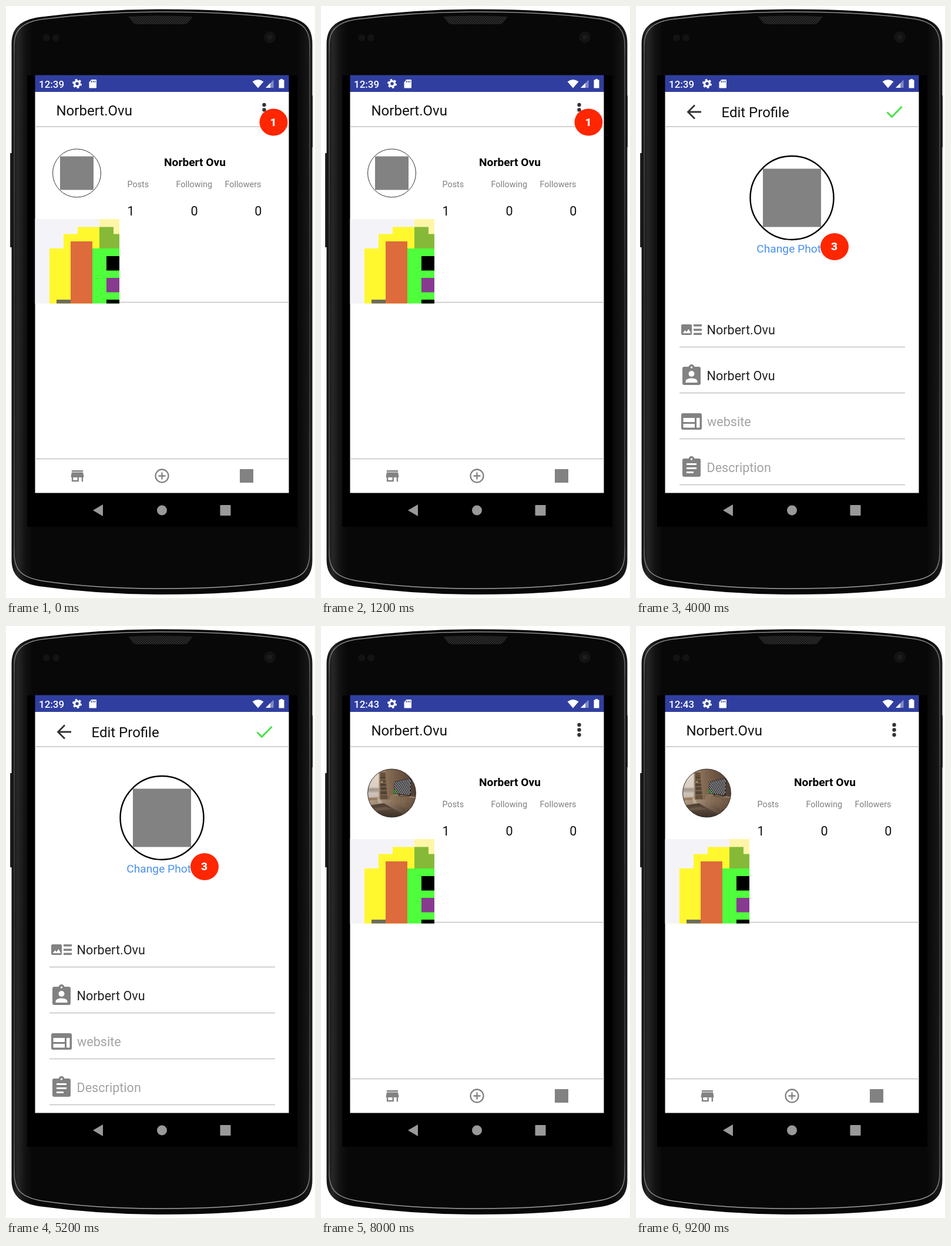
Write an HTML page that moves like this. It is 526 px wide and 1006 px high and loops after 10000 ms.

```html
<!DOCTYPE html>
<html lang="en">
<head>
<meta charset="utf-8">
<title>Profile photo walkthrough</title>
<style>
html, body { margin: 0; width: 100%; height: 100%; overflow: hidden; background: #fff; }
svg { display: block; }
text { font-family: Roboto, "Noto Sans", sans-serif; font-size: 24px; fill: #111; white-space: pre; }
.screen { visibility: hidden; }
.m { text-anchor: middle; }
.bold { font-size: 19.2px; font-weight: 700; fill: #000; }
.cap { font-size: 14.4px; fill: #808080; }
.count { font-size: 21.6px; }
.item { font-size: 19.2px; fill: #222; }
.field { font-size: 21.6px; fill: #222; }
.hint { fill: #a3a3a3; }
.tab { font-size: 16.8px; font-weight: 500; }
.clock { font-size: 17px; font-weight: 500; fill: #fff; }
.badge ellipse { fill: #ff2600; }
.badge text { font-size: 19px; font-weight: 900; font-stretch: 75%; fill: #fff; text-anchor: middle; }
.rule { stroke: #c3c3c3; stroke-width: 1.5; fill: none; }
.icon { fill: none; stroke: #333; stroke-width: 2.8; }
.grey { fill: #828282; }
</style>
</head>
<body>
<svg id="stage" width="526" height="1006" viewBox="0 0 526 1006">
<defs>
  <linearGradient id="side">
    <stop offset="0" stop-color="#111"/><stop offset=".02" stop-color="#272727"/>
    <stop offset=".045" stop-color="#121212"/><stop offset=".07" stop-color="#080808"/>
    <stop offset=".95" stop-color="#080808"/><stop offset="1" stop-color="#1b1b1b"/>
  </linearGradient>
  <linearGradient id="rim" x1="0" y1="0" x2="0" y2="1">
    <stop offset="0" stop-color="#8a8a8a"/><stop offset=".08" stop-color="#555"/>
    <stop offset=".5" stop-color="#333"/><stop offset=".92" stop-color="#555"/>
    <stop offset="1" stop-color="#a0a0a0"/>
  </linearGradient>
  <pattern id="mesh" width="4" height="4" patternUnits="userSpaceOnUse">
    <rect width="4" height="4" fill="#141414"/><path d="M0 0L4 4M4 0L0 4" stroke="#333" stroke-width=".8"/>
  </pattern>
  <linearGradient id="sky" x1="0" y1="0" x2="0" y2="1">
    <stop offset="0" stop-color="#e6dbd0"/><stop offset=".62" stop-color="#dacdc1"/>
    <stop offset=".7" stop-color="#a2958b"/><stop offset=".78" stop-color="#b3a69c"/>
    <stop offset=".84" stop-color="#cfc3ba"/><stop offset="1" stop-color="#c3b7ae"/>
  </linearGradient>
  <linearGradient id="wall">
    <stop offset="0" stop-color="#8a7058"/><stop offset=".5" stop-color="#6c5541"/><stop offset="1" stop-color="#4e3d30"/>
  </linearGradient>
  <linearGradient id="floor">
    <stop offset="0" stop-color="#b7a28b"/><stop offset=".45" stop-color="#957d66"/><stop offset="1" stop-color="#4f3f33"/>
  </linearGradient>
  <linearGradient id="rug" x1="0" y1="0" x2="0" y2="1">
    <stop offset="0" stop-color="#4c3e33"/><stop offset=".4" stop-color="#675444"/><stop offset="1" stop-color="#4a3b30"/>
  </linearGradient>
  <linearGradient id="wood">
    <stop offset="0" stop-color="#8f765d"/><stop offset="1" stop-color="#6c5643"/>
  </linearGradient>
  <linearGradient id="shade" x1="0" y1="0" x2="0" y2="1">
    <stop offset="0" stop-color="#2a1f17" stop-opacity="0"/><stop offset="1" stop-color="#2a1f17" stop-opacity=".4"/>
  </linearGradient>
  <clipPath id="face"><circle cx="120.5" cy="284" r="41"/></clipPath>

  <symbol id="room" viewBox="50 158.5 432 432">
    <rect x="50" y="158" width="432" height="433" fill="url(#floor)"/>
    <path d="M50 158H215L237 430L50 441Z" fill="#977c62"/>
    <path d="M50 158H152V410L50 417Z" fill="url(#sky)"/>
    <path d="M151 158V410L50 416" fill="none" stroke="#bfa78e" stroke-width="4"/>
    <path d="M210 158H482V410L257 390L252 432H237Z" fill="url(#wall)"/>
    <path d="M262 158V250M300 158V240M338 158V235M376 158V232M414 158V225M452 158V400" stroke="#55432f" fill="none" opacity=".4"/>
    <path d="M161 190H212L236 430H162Z" fill="#65503c"/>
    <path d="M163 229h42v19h-42zM178 266h28v16h-28zM164 290h48v24h-48zM165 324h52v23h-52zM167 363h52v23h-52z" fill="#4d4136"/>
    <ellipse cx="179" cy="274" rx="8" ry="6" fill="#c1ae99"/>
    <path d="M161 190V430M210 190L234 430M162 249H217M162 283H220M162 315H224M162 349H227M162 388H231" fill="none" stroke="#9a7e62" stroke-width="4"/>
    <path d="M50 455L160 434M50 475L235 433M110 478L75 450M150 472L115 444M215 474L180 440M290 500L220 438" stroke="#846d57" fill="none"/>
    <path d="M50 487L195 466L420 591H50Z" fill="url(#rug)"/>
    <path d="M50 520L205 497L262 520L50 545Z" fill="#83705d" opacity=".6"/>
    <path d="M257 392L306 385L482 408V420L400 428Z" fill="#967c63"/>
    <path d="M257 392L482 421V510L402 520L262 455Z" fill="url(#wood)"/>
    <path d="M313 399V478M342 403V490M410 414V519" stroke="#5f4b3a" fill="none"/>
    <path d="M262 455l8 4-5 14h-3zM386 512l12 7-6 17h-3zM441 515l12-1-3 24h-3z" fill="#7d6550"/>
    <path d="M323 386L365 391L430 399Q420 407 355 404L325 397L340 392" fill="none" stroke="#28221e" stroke-width="4"/>
    <path d="M286 273L441 238L437 398L287 378Z" fill="#2a2520"/>
    <path d="M289 277L435 244L432 391L289 375Z" fill="#b0b0b7"/>
    <path id="checks" fill="#111"/>
    <path d="M288 347L304 349V377L288 375Z" fill="#12a512"/>
    <path d="M139 412l5 5 7-1 4-4 2 16 11 12q8 12 4 20h17l-2 3-22 3-23-1-2-25-3-16Z" fill="#b9aa96"/>
    <rect x="50" y="450" width="432" height="141" fill="url(#shade)"/>
  </symbol>

  <rect id="page" x="49.5" y="146" width="432" height="681.5"/>

  <g id="profile">
    <use href="#page" fill="#fff"/>
    <path class="rule" d="M49.5 205H481.5M193 503.5H481.5"/>
    <text x="85.5" y="186">Norbert.Ovu</text>
    <g fill="#333"><circle cx="439.5" cy="168" r="3.2"/><circle cx="439.5" cy="176.5" r="3.2"/><circle cx="439.5" cy="185" r="3.2"/></g>
    <text class="bold m" x="321.5" y="272">Norbert Ovu</text>
    <text class="cap" x="206.5" y="308">Posts</text>
    <text class="cap" x="289.5" y="308">Following</text>
    <text class="cap" x="372.5" y="308">Followers</text>
    <text class="count" x="206.5" y="356">1</text>
    <text class="count" x="314.5" y="356">0</text>
    <text class="count" x="423.3" y="356">0</text>
    <rect x="49.5" y="362" width="143.5" height="143.5" fill="#f4f4f8"/>
    <path d="M74 505.5V412H98V387.5H122V375.5H159V412H147V505.5Z" fill="#fff82f"/>
    <path d="M159 362H193V388H159Z" fill="#fff5a6"/>
    <path d="M159 375.5H183V387.5H193V412H159Z" fill="#86b938"/>
    <path d="M147 412H193V505.5H147Z" fill="#4fff3c"/>
    <path d="M110 400H147V505.5H110Z" fill="#dd6b3c"/>
    <path d="M171 425h22v24.5h-22zM171 499h22v6.5h-22z" fill="#000"/>
    <path d="M171 462h22v24.5h-22z" fill="#873a8f"/>
    <path d="M86 499h24v6.5h-24z" fill="#6c6c5c"/>
  </g>

  <g id="tabs">
    <path class="rule" d="M49.5 769.5H481.5"/>
    <path class="grey" transform="translate(107.1 784.2) scale(1.2)" d="M20 4H4v2h16V4zm1 10v-2l-1-5H4l-1 5v2h1v6h10v-6h4v6h2v-6h1zm-9 4H6v-4h6v4z"/>
    <g fill="none" stroke="#828282" stroke-width="2.3"><circle cx="265.5" cy="798.5" r="11"/><path d="M259.5 798.5h12M265.5 792.5v12"/></g>
    <rect class="grey" x="398" y="787" width="23" height="23"/>
  </g>

  <path id="back" class="icon" d="M111 180H89M100 168.5L88.5 180l11.5 11.5"/>
</defs>

<!-- handset -->
<path d="M10 250h-3v160h3zM520 152h2v88h-2z" fill="#222"/>
<path d="M9.5 64C9.5 36 26 24 56 19Q160 5.5 265 5.5Q390 5.5 476 18C508 23 521.5 36 521.5 64V941C521.5 969 508 982 476 987Q390 1000 265 1000Q160 1000 56 986C26 981 9.5 969 9.5 941Z" fill="url(#side)"/>
<path d="M14 66C14 40 29 28 58 23Q160 10 265 10Q390 10 474 22C505 27 517 40 517 66V930C517 960 504 972 470 977Q385 990 265 990Q150 990 62 977C28 971 14 960 14 930Z" fill="none" stroke="url(#rim)" stroke-width="1.6"/>
<path d="M208 18Q265 15 318 18L310 28Q308 31 302 31H224Q218 31 216 28Z" fill="url(#mesh)"/>
<g fill="#131313"><circle cx="69" cy="54" r="6"/><circle cx="85" cy="54" r="6"/><circle cx="449" cy="53" r="10"/></g>
<circle cx="449" cy="53" r="4" fill="#1c1c22"/>
<rect x="36" y="118" width="460" height="767" fill="#000"/>
<g fill="#999"><path d="M148 857L165 847V867Z"/><circle cx="265.5" cy="857" r="8.5"/><rect x="364.5" y="848" width="18" height="18" rx="1"/></g>

<!-- status bar -->
<rect x="49.5" y="117.5" width="432" height="29" fill="#303f9f"/>
<text id="clock" class="clock" x="56" y="138.5"></text>
<g fill="none" stroke="#fff"><circle cx="121" cy="132" r="4.4" stroke-width="3.4"/><circle cx="121" cy="132" r="6.8" stroke-width="2.4" stroke-dasharray="3.56"/></g>
<path d="M145.5 125H153q1 0 1 1V138.5q0 1-1 1H142.5q-1 0-1-1V129.5Z" fill="#fff"/>
<path d="M145.5 127v3M148.5 127v3M151.5 127v3" stroke="#303f9f" stroke-width="1.3"/>
<path d="M419.5 128.5Q429 121.5 438.5 128.5L429 139.5Z" fill="#fff"/>
<path d="M455.5 125.5V139H442Z" fill="#fff" opacity=".4"/><path d="M450 131V139H442Z" fill="#fff"/>
<path d="M467 124h4v1.5h2.5v14h-9v-14h2.5Z" fill="#fff"/>

<!-- screens -->
<g class="screen">
  <use href="#profile"/><use href="#tabs"/>
  <rect class="grey" x="92" y="255.5" width="57" height="57"/>
  <circle cx="120.5" cy="284" r="41" fill="none" stroke="#333"/>
  <g class="badge" data-at="455.5 197.5">1</g>
</g>
<g class="screen">
  <use href="#page" fill="#fff"/>
  <use href="#tabs"/><use href="#back"/>
  <text x="145.5" y="189">Options</text>
  <text x="74" y="275" style="font-size:42px">Account Settings</text>
  <path class="rule" d="M49.5 205H481.5M74 285.5H458M74 344.5H458M74 403H458"/>
  <text class="item" x="91.5" y="322">Edit Profile</text>
  <text class="item" x="91.5" y="381">Sign out</text>
  <g class="badge" data-at="198.5 310">2</g>
</g>
<g class="screen">
  <use href="#page" fill="#fff"/>
  <use href="#back"/>
  <text x="145.5" y="189">Edit Profile</text>
  <path d="M427.5 180.5L435.5 188.5L452.5 171" class="icon" style="stroke:#3fe33f"/>
  <path class="rule" d="M49.5 205H481.5M74 579.5H458M74 657.5H458M74 735.5H458M74 813.5H458"/>
  <rect class="grey" x="216" y="276.5" width="99" height="99"/>
  <circle cx="265.5" cy="326" r="71" fill="none" stroke="#000" stroke-width="2.4"/>
  <text class="item m" x="265.5" y="419" style="fill:#4a90f0">Change Photo</text>
  <g class="grey">
    <rect x="77" y="541" width="18" height="18" rx="2"/>
    <path d="M98 541h14v3.5h-14zM98 548.5h14v3.5h-14zM98 555.5h14v3.5h-14z"/>
    <rect x="79" y="613" width="31" height="31" rx="3"/><circle cx="94.5" cy="614" r="5"/>
    <rect x="77" y="692" width="35" height="28" rx="3"/>
    <rect x="79" y="769" width="31" height="31" rx="3"/><circle cx="94.5" cy="770" r="5"/>
  </g>
  <g fill="#fff">
    <path d="M79.5 556l4-5 2.5 3 3.5-5 4 7z"/>
    <circle cx="94.5" cy="614" r="1.7"/><circle cx="94.5" cy="625" r="5"/><path d="M84.5 640v-2q0-5 10-5.5q10 .5 10 5.5v2z"/>
    <path d="M80.5 700h19.5v7h-19.5zM80.5 710h19.5v6.5h-19.5zM103 700h5.5v16.5h-5.5z"/>
    <circle cx="94.5" cy="770" r="1.7"/><path d="M86 777h17v3h-17zM86 784h17v3h-17zM86 791h12v3h-12z"/>
  </g>
  <text class="field" x="120.5" y="558">Norbert.Ovu</text>
  <text class="field" x="120.5" y="636">Norbert Ovu</text>
  <text class="field hint" x="121" y="714">website</text>
  <text class="field hint" x="120.5" y="792">Description</text>
  <g class="badge" data-at="338 409">3</g>
</g>
<g class="screen">
  <use href="#page" fill="#fafafa"/>
  <path class="icon" d="M77.5 167L96.5 186M96.5 167L77.5 186"/>
  <text class="item" x="138.5" y="183">/camera</text>
  <path d="M242 174h13l-6.5 6.5z" fill="#777"/>
  <text x="412.5" y="185.5" style="fill:#4a90f0">Next</text>
  <path class="rule" d="M49.5 205H481.5M49.5 826.5H481.5"/>
  <svg x="49.5" y="207" width="432" height="335" viewBox="50 207 432 335"><use href="#room" x="50" y="158.5" width="432" height="432"/></svg>
  <use href="#room" x="49.5" y="544" width="143.5" height="143.5"/>
  <text class="tab m" x="157" y="803" style="fill:#212121">GALLERY</text>
  <text class="tab m" x="373.5" y="803" style="fill:#757575">PHOTO</text>
  <rect x="49.5" y="823" width="216" height="2.5" fill="#ff4081"/>
  <g class="badge" data-at="173.5 669">4</g>
  <g class="badge" data-at="452.5 179">5</g>
</g>
<g class="screen">
  <use href="#profile"/><use href="#tabs"/>
  <g clip-path="url(#face)"><use href="#room" x="79.5" y="243" width="82" height="82"/></g>
  <circle cx="120.5" cy="284" r="41" fill="none" stroke="#333"/>
</g>
</svg>
<script>
const HOLD = 2000;
const screens = [...document.querySelectorAll('.screen')];
const clock = document.getElementById('clock');

for (const badge of document.querySelectorAll('.badge')) {
  const n = badge.textContent;
  badge.setAttribute('transform', `translate(${badge.dataset.at})`);
  badge.innerHTML = `<ellipse rx="24" ry="23"/><text x="-.5" y="6">${n}</text>`;
}

// Checkerboard laid across the slanted television panel
const COLS = 16, ROWS = 9;
function point(u, v) {
  const top = 277 - 33 * u, bottom = 375 + 16 * u;
  return `${289 + (146 - 3 * v) * u} ${top + (bottom - top) * v}`;
}
let d = '';
for (let r = 0; r < ROWS; r++) {
  for (let c = (r + 1) % 2; c < COLS; c += 2) {
    const [l, t, e, b] = [c / COLS, r / ROWS, (c + 1) / COLS, (r + 1) / ROWS];
    d += `M${point(l, t)}L${point(e, t)}L${point(e, b)}L${point(l, b)}Z`;
  }
}
document.getElementById('checks').setAttribute('d', d);

let shown = -1;
function draw() {
  const step = Math.floor(performance.now() / HOLD) % screens.length;
  if (step !== shown) {
    screens.forEach((s, i) => { s.style.visibility = i === step ? 'visible' : 'hidden'; });
    clock.textContent = step < 3 ? '12:39' : '12:43';
    shown = step;
  }
  requestAnimationFrame(draw);
}
draw();
</script>
</body>
</html>
```
